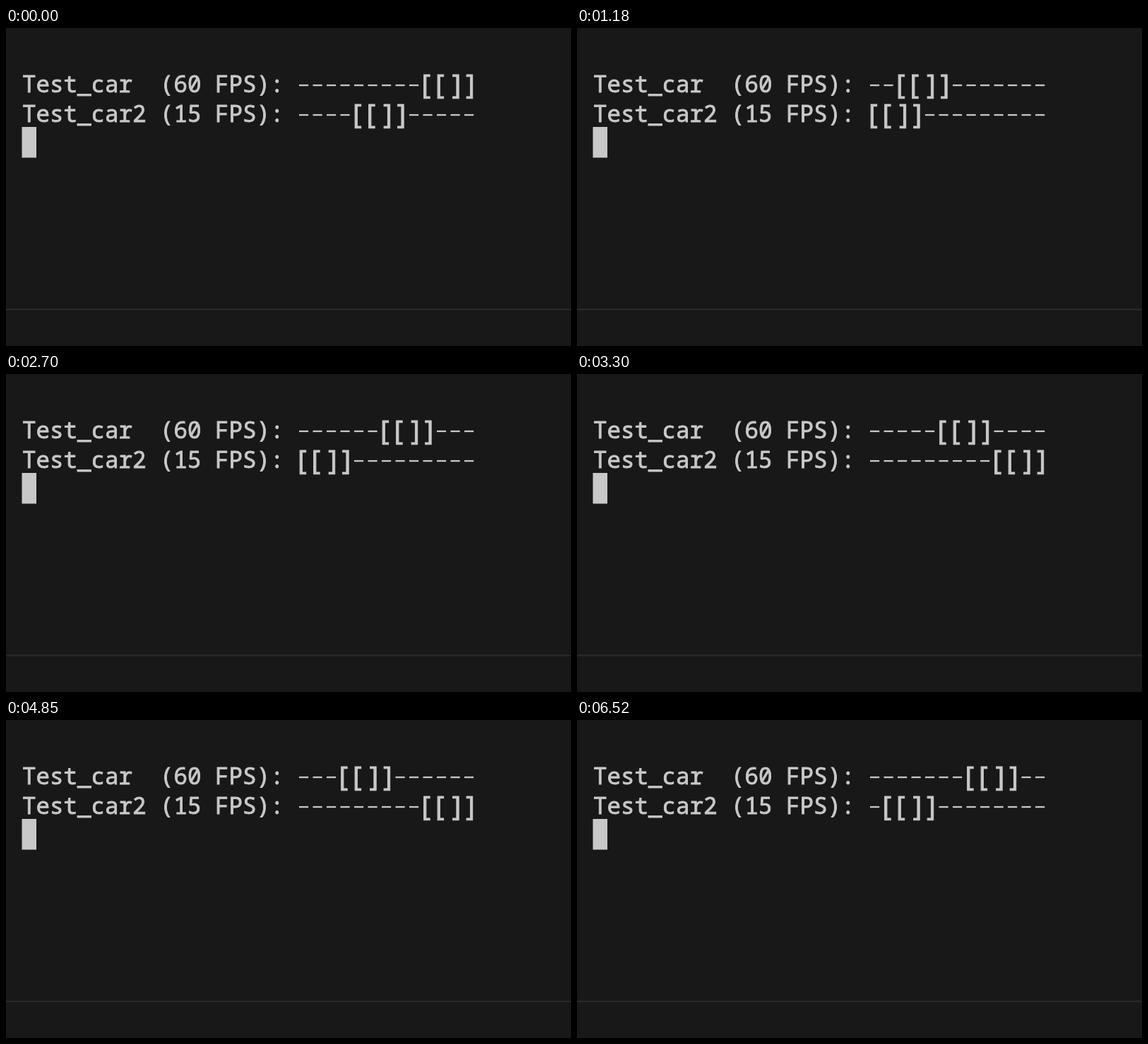
An HTML page for the animation above (6550 ms loop, 800x450 px).

```html
<!DOCTYPE html>
<html lang="en">
<head>
<meta charset="utf-8">
<title>Terminal cars</title>
<style>
  html, body { margin: 0; width: 100%; height: 100%; overflow: hidden; background: #181818; }
  svg { display: block; width: 100vw; height: 100vh; }
  text {
    font: 400 32.5px "Noto Sans Mono", "DejaVu Sans Mono", monospace;
    font-variant-ligatures: none;
    white-space: pre;
    fill: #c8c8c8;
    stroke: #c8c8c8;
    stroke-width: 0.9px;
  }
  /* Letter spacing keeps every size on the 19.5 px cell */
  .road { font-size: 28.6px; letter-spacing: 2.34px; stroke: none; }
  .car { font-size: 38px; letter-spacing: -3.3px; stroke-width: 1px; }
</style>
</head>
<body>
<svg viewBox="0 0 800 450">
  <rect width="800" height="450" fill="#181818"/>
  <rect y="397.3" width="800" height="2" fill="#2b2b2b"/>
  <g id="rows"></g>
  <rect id="cursor" x="22.5" width="20.5" height="43.5" fill="#c8c8c8"/>
</svg>
<script>
  const LOOP = 6550;
  const REFRESH = 32.6;
  const SLOW_STEP = 74.93;
  const SLOW_LEAD = 73;
  const CELLS = 10;
  const LEFT = 23, CELL = 19.5, TRACK = LEFT + 20 * CELL;

  // [ms, steps taken by the fast car]; its pace drifts slightly
  const PACE = [[0, 0], [1180, 73], [2090, 130], [3300, 206], [4850, 304],
                [5940, 372], [6520, 408], [LOOP, 410]];
  const CLEARED = [5940, 5970];

  const rows = document.getElementById("rows");
  const cursor = document.getElementById("cursor");

  function addText(y, className, content = "") {
    const node = document.createElementNS("http://www.w3.org/2000/svg", "text");
    node.setAttribute("x", LEFT);
    node.setAttribute("y", y);
    node.setAttribute("class", className);
    node.textContent = content;
    rows.append(node);
    return node;
  }

  // Returns a function that puts the row's car on a cell
  function addRow(label, y) {
    addText(y, "label", label);
    const behind = addText(y, "road"), ahead = addText(y, "road");
    const back = addText(y + 2, "car", "[["), front = addText(y + 2, "car", "]]");
    behind.setAttribute("x", TRACK);
    return steps => {
      const pos = steps % CELLS;
      const x = TRACK + pos * CELL;
      behind.textContent = "−".repeat(pos);
      ahead.textContent = "−".repeat(CELLS - 1 - pos);
      back.setAttribute("x", x - 6);
      front.setAttribute("x", x + 2 * CELL);
      ahead.setAttribute("x", x + 4 * CELL);
    };
  }

  const moveFast = addRow("Test_car  (60 FPS):", 90.5);
  const moveSlow = addRow("Test_car2 (15 FPS):", 133);

  // Holds each picture for one screen refresh
  function sample(t) {
    const i = PACE.findIndex(point => t < point[0]) - 1;
    const [t0, n0] = PACE[i], [t1, n1] = PACE[i + 1];
    const count = Math.max(1, Math.round((t1 - t0) / REFRESH));
    const part = Math.floor((t - t0) / (t1 - t0) * count + 1e-6) / count;
    return { time: t0 + part * (t1 - t0), steps: Math.round(n0 + part * (n1 - n0)) };
  }

  function render(t) {
    const { time, steps } = sample(t);
    const cleared = t >= CLEARED[0] && t < CLEARED[1];
    moveFast(9 + steps);
    moveSlow(4 + Math.floor((time + SLOW_LEAD) / SLOW_STEP));
    rows.setAttribute("visibility", cleared ? "hidden" : "visible");
    cursor.setAttribute("y", cleared ? 54 : 140);
  }

  const start = performance.now();
  function tick() {
    render((performance.now() - start) % LOOP);
    requestAnimationFrame(tick);
  }
  tick();
</script>
</body>
</html>
```
